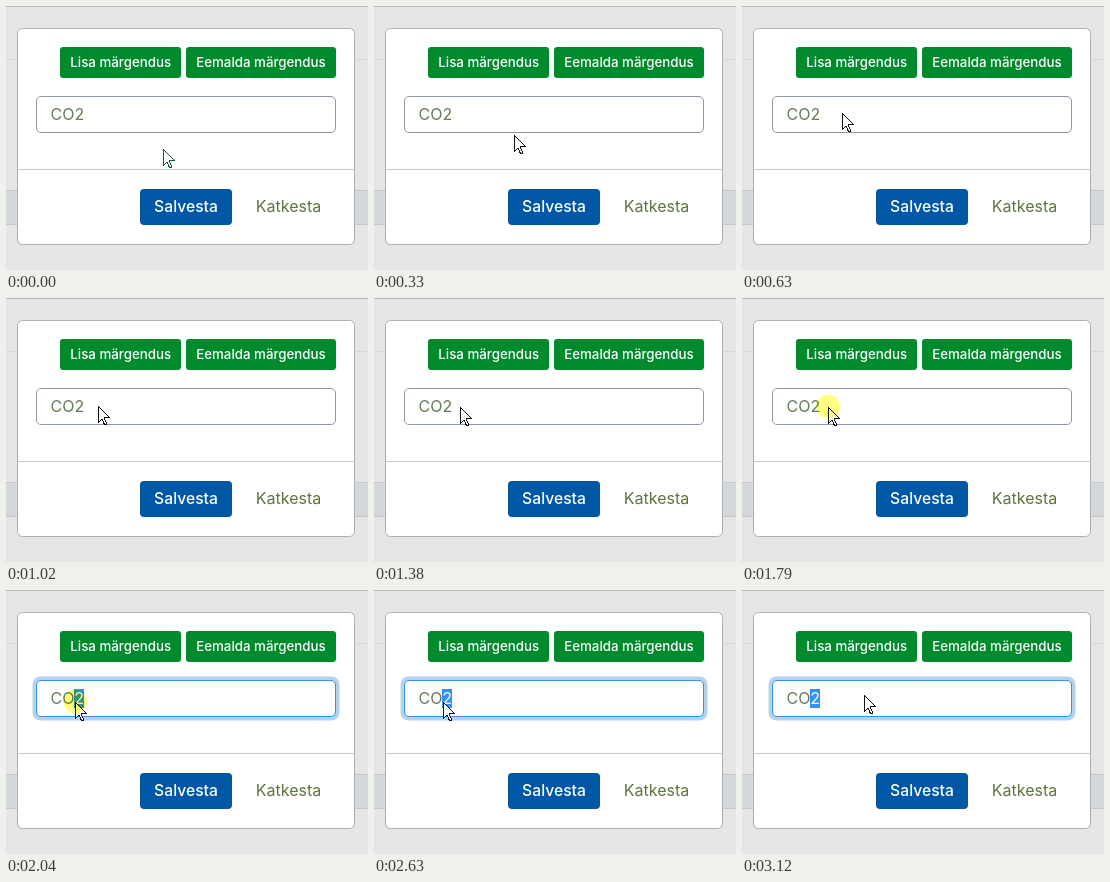
Write an HTML page that moves like this. It is 362 px wide and 264 px high and loops after 4030 ms.

```html
<!DOCTYPE html>
<html lang="et">
<head>
<meta charset="utf-8">
<style>
  html, body { margin: 0; width: 100%; height: 100%; overflow: hidden; background: #e5e5e5; }
  svg { display: block; font: 16px Inter, Roboto, sans-serif; }
  .mid { text-anchor: middle; }
  .button { font-size: 15.7px; font-weight: 500; fill: #fff; }
  .small { font-size: 13.3px; }
  #spot { mix-blend-mode: multiply; }
</style>
</head>
<body>
<svg width="362" height="264" viewBox="0 0 362 264">
  <rect width="362" height="264" fill="#e5e5e5"/>
  <path d="M0 .5H362" stroke="#b8b8b8"/>
  <path d="M0 53.5H362" stroke="#d8d8d8"/>
  <rect y="184" width="362" height="35" fill="#d4d8db"/>
  <path d="M0 184.5H362M0 218.5H362" stroke="#c4c8cb"/>

  <rect x="11.5" y="22.5" width="337" height="216" rx="5" fill="#fff" stroke="#b0b0b0"/>
  <path d="M12 163.5H348" stroke="#c8c8c8"/>

  <g fill="#008a2e">
    <rect x="54" y="41" width="121" height="31" rx="3.2"/>
    <rect x="180" y="41" width="150" height="31" rx="3.2"/>
  </g>
  <rect x="134" y="183" width="92" height="36" rx="4" fill="#0057a6"/>
  <g class="mid button">
    <text class="small" x="114.7" y="61">Lisa märgendus</text>
    <text class="small" x="255" y="61">Eemalda märgendus</text>
    <text x="180" y="206">Salvesta</text>
  </g>
  <text class="mid" x="282.5" y="206" fill="#5f7440">Katkesta</text>

  <rect id="halo" x="26.5" y="86.5" width="307" height="44" rx="8" fill="#b7d2ec"/>
  <rect id="field" x="30.5" y="90.5" width="299" height="36" rx="4.5" fill="#fff"/>
  <text x="44.6" y="114" fill="#687b58">CO2</text>
  <g id="selection">
    <rect x="68" y="99" width="10" height="19" fill="#3390ff"/>
    <text x="68.3" y="114" fill="#fff">2</text>
  </g>
  <path id="pointer" d="M.5 .5V16.5L4 13L6.5 18.5H8.5V17L6.5 12.5V11.5H11.5Z"
        fill="#fff" shape-rendering="crispEdges"/>
  <circle id="spot" cy="-.5" r="11.8" fill="#ffff80"/>
</svg>
<script>
const LOOP = 4030, STEP = 75;
const PRESS = 1720, FOCUS = 1800, SELECT = 1960, RELEASE = 2630;

const linear = u => u;
const smooth = u => u * u * (3 - 2 * u);
const easeOut = u => 1 - (1 - u) ** 2;

// Pointer moves: first and last step in ms, where they lead, easing
const origin = [157, 143];
const moves = [
  [90, 180, [145, 132], linear],
  [330, 630, [100, 107], smooth],
  [870, 1170, [87, 109], linear],
  [1380, 1380, [86, 109], linear],
  [FOCUS, 2040, [69, 112], easeOut],
  [2720, 2720, [70, 113], linear],
  [2880, 3120, [122, 105], smooth]
];

function pointerAt(t) {
  let pos = origin;
  for (const [from, to, goal, ease] of moves) {
    if (t < from) break;
    const count = Math.round((to - from) / STEP) + 1;
    const gap = (to - from) / (count - 1) || STEP;
    const u = ease(Math.min(1, (Math.floor((t - from) / gap + 1e-6) + 1) / count));
    pos = pos.map((v, i) => Math.round(v + (goal[i] - v) * u));
  }
  return pos;
}

const el = id => document.getElementById(id);
const halo = el('halo'), field = el('field'), spot = el('spot');
const selection = el('selection'), pointer = el('pointer');
const show = (node, on) => node.setAttribute('visibility', on ? 'visible' : 'hidden');

function draw(t) {
  const place = `translate(${pointerAt(t)})`;
  pointer.setAttribute('transform', place);
  pointer.setAttribute('stroke', t < moves[0][0] ? '#0b5a42' : '#111');
  spot.setAttribute('transform', place);
  show(spot, t >= PRESS && t < RELEASE);
  show(halo, t >= FOCUS);
  field.setAttribute('stroke', t >= FOCUS ? '#2d92f0' : '#8c96aa');
  show(selection, t >= SELECT);
}

const start = performance.now();
function tick() {
  draw((performance.now() - start) % LOOP);
  requestAnimationFrame(tick);
}
tick();
</script>
</body>
</html>
```
